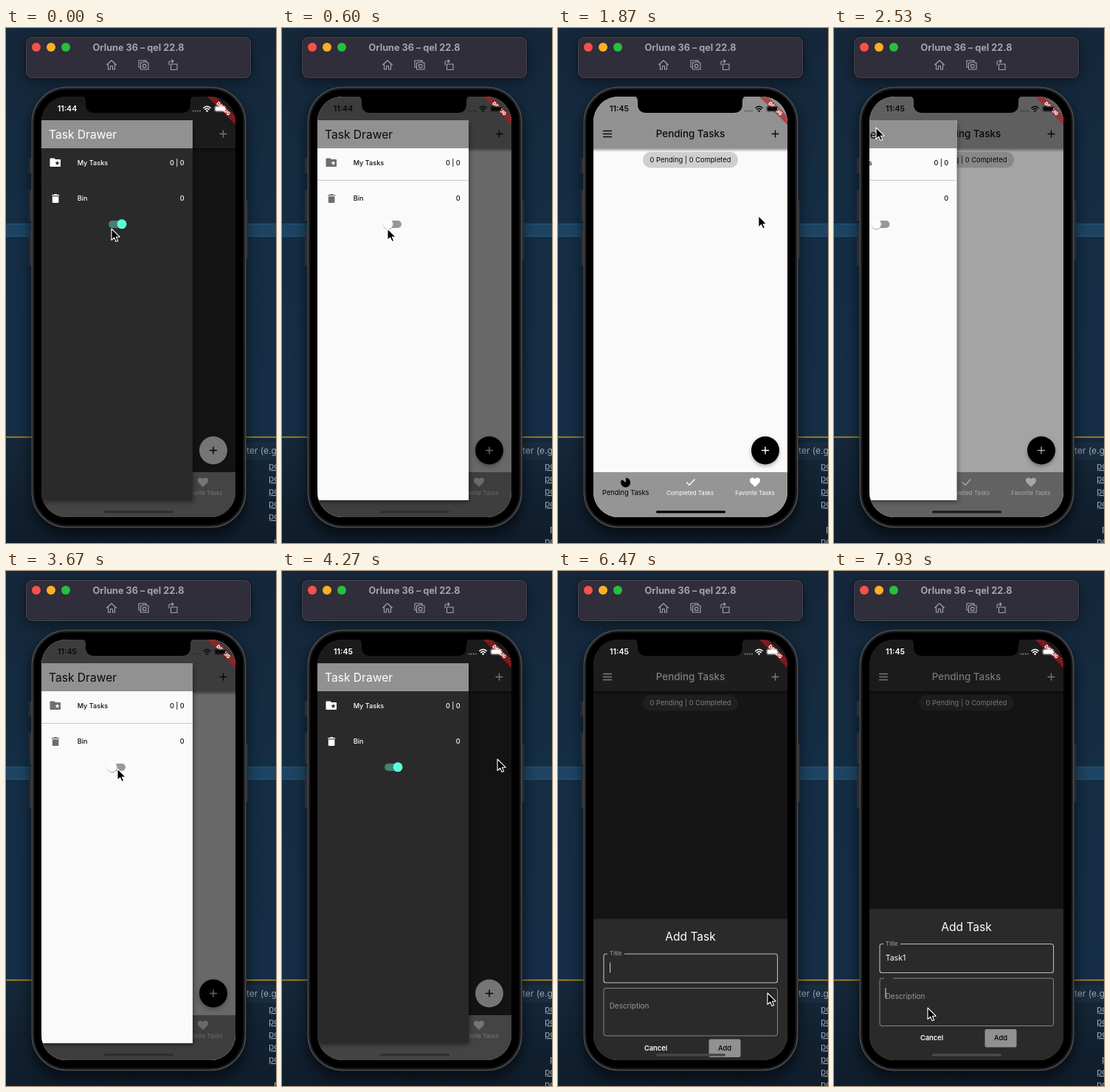
An HTML page for the animation above (8000 ms loop, 366 by 698 pixels).

```html
<!DOCTYPE html>
<html lang="en">
<head>
<meta charset="utf-8">
<title>Task drawer demo</title>
<style>
  html, body { margin: 0; width: 100%; height: 100%; overflow: hidden; background: #14293d; }
  svg { display: block; width: 366px; height: 698px; font-family: Inter, Roboto, sans-serif; }
  .mid { text-anchor: middle; }
  .end { text-anchor: end; }
  .line { fill: none; stroke-linecap: round; stroke-linejoin: round; }
  .bar { fill: var(--bar); }
  .canvas { fill: var(--canvas); }
  .ink { fill: var(--ink); }
  .inkLine { stroke: var(--ink); }
  .icon { fill: var(--icon); }
</style>
</head>
<body>
<svg viewBox="0 0 366 698">
  <defs>
    <linearGradient id="sky" x1="0" y1="0" x2="0" y2="1">
      <stop offset="0" stop-color="#15273a"/><stop offset=".45" stop-color="#142d43"/><stop offset="1" stop-color="#152d46"/>
    </linearGradient>
    <linearGradient id="panel" x1="0" y1="0" x2="0" y2="1">
      <stop offset="0" stop-color="#152839"/><stop offset="1" stop-color="#0f1c2b"/>
    </linearGradient>
    <linearGradient id="fade" x1="0" y1="0" x2="0" y2="1">
      <stop offset="0" stop-opacity=".4"/><stop offset="1" stop-opacity="0"/>
    </linearGradient>
    <filter id="soft" x="-30%" y="-30%" width="160%" height="160%"><feGaussianBlur stdDeviation="9"/></filter>
    <filter id="near" x="-30%" y="-30%" width="160%" height="160%"><feGaussianBlur stdDeviation="3"/></filter>
    <clipPath id="screen"><rect x="48" y="93" width="263" height="570" rx="34"/></clipPath>
  </defs>

  <!-- desktop -->
  <rect width="366" height="555" fill="url(#sky)"/>
  <rect y="265" width="366" height="18" fill="#1d4462"/>
  <path d="M0 265.5H366M0 282.5H366" stroke="#285372"/>
  <rect y="554" width="366" height="144" fill="url(#panel)"/>
  <path d="M0 554.5H366" stroke="#c2951f" stroke-width="1.4"/>
  <rect x="300" y="561" width="66" height="24" fill="#1a2d40"/>
  <text x="326" y="577" font-size="12" fill="#9aa5b0">ter (e.g</text>
  <g id="log" font-size="12" fill="#98a4b0"></g>

  <!-- window toolbar -->
  <rect x="27" y="18" width="305" height="54" rx="9" opacity=".45" filter="url(#soft)"/>
  <rect x="26.5" y="11.5" width="306" height="57" rx="9" fill="#302e3b" stroke="#0d1219"/>
  <rect x="27.5" y="12.5" width="304" height="55" rx="8" fill="none" stroke="#4d4b57" stroke-width=".8"/>
  <circle cx="41" cy="26" r="6" fill="#f8524b"/>
  <circle cx="61" cy="26" r="6" fill="#fcb024"/>
  <circle cx="81" cy="26" r="6" fill="#28bf3c"/>
  <text class="mid" x="179.5" y="30.5" font-size="12.7" font-weight="700" fill="#a5a3ad">Orlune 36 – qel 22.8</text>
  <g class="line" stroke="#a5a3ad" stroke-width="1.1">
    <path d="M136.500 50L143 44L149.500 50M138.500 49V56H141.500V51.500H144.500V56H147.500V49"/>
    <path d="M182 53H180V44H190V46M182.500 47H185L186 45.800H189.500L190.500 47H193V56H182.500Z"/>
    <circle cx="187.700" cy="51.400" r="2.300"/>
    <path d="M223.500 49H232V56.500H223.500ZM221 50V46Q221 45 222 45H227M225 43L227 45L225 47"/>
  </g>

  <!-- phone body -->
  <rect x="34" y="88" width="292" height="598" rx="47" opacity=".6" filter="url(#soft)"/>
  <path d="M33 176V197M33 219V262M33 275V322M326 234V313" stroke="#2b2d31" stroke-width="4"/>
  <rect x="35.500" y="80.500" width="289" height="596" rx="47" stroke="#46474a" stroke-width="2"/>
  <rect x="37.500" y="82.500" width="285" height="592" rx="45" fill="none" stroke="#1d1d1f" stroke-width="1.500"/>

  <g clip-path="url(#screen)">
    <rect class="canvas" x="48" y="93" width="263" height="570"/>
    <rect x="48" y="163" width="263" height="5" fill="url(#fade)"/>
    <rect class="bar" x="48" y="93" width="263" height="70"/>
    <path class="line inkLine" d="M61.500 139.500H72.500M61.500 143.500H72.500M61.500 147.500H72.500" stroke-width="1.300"/>
    <path class="line inkLine" d="M290 143.500H299M294.500 139V148" stroke-width="1.400"/>
    <text class="ink mid" x="179.500" y="148.300" font-size="13.400" font-weight="500">Pending Tasks</text>
    <rect x="115" y="168" width="129" height="21.500" rx="10.700" fill="var(--chip)"/>
    <text class="ink mid" x="179.500" y="182.200" font-size="9.400">0 Pending | 0 Completed</text>

    <circle cx="281" cy="575" r="18" opacity=".4" filter="url(#near)"/>
    <circle cx="281" cy="572.500" r="19" fill="var(--fab)"/>
    <path class="line" d="M276.500 572.500H285.500M281 568V577" stroke="var(--fabInk)" stroke-width="1.400"/>

    <rect x="48" y="602" width="263" height="61" fill="#959595"/>
    <g fill="var(--pick)">
      <path d="M92 616V609.500A6.500 6.500 0 1 1 86.500 612Z"/>
      <path d="M92 616L86 610.500L90 608.800Z" fill="#959595"/>
      <text class="mid" x="91.700" y="632.500" font-size="9.200">Pending Tasks</text>
    </g>
    <g fill="#fff">
      <path class="line" d="M174.500 616L178 619.500L185 612" fill="none" stroke="#fff" stroke-width="1.400"/>
      <path d="M267 622L261.800 617C258.500 613.500 260 609.500 263.500 609.500Q265.700 609.500 267 611.300Q268.300 609.500 270.500 609.500C274 609.500 275.500 613.500 272.200 617Z"/>
      <text class="mid" x="179.200" y="632.500" font-size="7.850">Completed Tasks</text>
      <text class="mid" x="267" y="632.500" font-size="7.850">Favorite Tasks</text>
    </g>

    <rect id="scrim" x="48" y="93" width="263" height="570"/>

    <g id="drawer">
      <rect x="48" y="130" width="206" height="512" opacity=".45" filter="url(#near)"/>
      <rect class="canvas" x="48" y="125" width="205" height="515"/>
      <rect x="48" y="125" width="205" height="38" fill="#919191"/>
      <text class="ink" x="58" y="150" font-size="15.600">Task Drawer</text>
      <path d="M48 206.500H253" stroke="var(--rule)"/>
      <path class="icon" d="M60.500 176.500H65.500L67 178H73Q74 178 74 179V187Q74 188 73 188H60.500Q59.500 188 59.500 187V177.500Q59.500 176.500 60.500 176.500Z"/>
      <path class="canvas" d="M69.500 179.800L70.300 182L72.600 182.100L70.800 183.500L71.400 185.700L69.500 184.500L67.600 185.700L68.200 183.500L66.400 182.100L68.700 182Z"/>
      <path class="icon" d="M62 226H65L65.700 225H68.700L69.400 226H72.200V227.300H62ZM62.800 228.300H71.400V236Q71.400 237 70.400 237H63.800Q62.800 237 62.800 236Z"/>
      <g class="ink" font-size="9.150" font-weight="500">
        <text x="96.700" y="185.500">My Tasks</text>
        <text x="96.700" y="234.300">Bin</text>
        <text class="end" x="241.700" y="185.500">0 | 0</text>
        <text class="end" x="241.700" y="234.300">0</text>
      </g>
      <rect x="139" y="261" width="23" height="10" rx="5" fill="var(--track)"/>
      <g id="thumb">
        <circle cy="267" r="6.500" opacity=".3"/>
        <circle cy="265.800" r="6.500" fill="var(--thumb)"/>
      </g>
    </g>

    <g id="sheet">
      <rect x="48" y="458" width="263" height="206" fill="#2a2a2a"/>
      <text class="mid" x="179.500" y="487.500" font-size="15.600" fill="#fff">Add Task</text>
      <rect x="62" y="505.500" width="235.500" height="39" rx="3" fill="none" stroke="#bdbdbd" stroke-width="1.100"/>
      <rect x="67" y="503" width="23" height="5" fill="#2a2a2a"/>
      <text x="70" y="508" font-size="8.100" fill="#a2a2a2">Title</text>
      <text id="typed" x="69.700" y="528" font-size="10.500" fill="#fff"></text>
      <rect x="62" y="552" width="235.500" height="64.500" rx="3" fill="none" stroke="#858585"/>
      <rect id="gap" x="68" y="550" width="12" height="4" fill="#2a2a2a"/>
      <text x="69.700" y="579.500" font-size="9.950" fill="#999">Description</text>
      <rect id="caret" width="1.200" height="14" fill="#bbb"/>
      <text class="mid" x="132.500" y="636.300" font-size="9.300" font-weight="600" fill="#fff">Cancel</text>
      <rect x="204.500" y="621" width="43" height="24.500" rx="2.500" fill="#919191"/>
      <text class="mid" x="226" y="636.300" font-size="9.300" font-weight="500">Add</text>
    </g>

    <!-- system overlays -->
    <g transform="translate(311 93) rotate(45)">
      <rect x="-28" y="18.900" width="56" height="8.100" fill="#b71c1c" fill-opacity=".63"/>
      <text class="mid" y="25.400" font-size="6.700" font-weight="900" fill="#fff">DEBUG</text>
    </g>
    <path d="M102 92.500Q108 92.500 108 99V103Q108 115 120 115H238Q250 115 250 103V99Q250 92.500 256 92.500Z"/>
    <text id="clock" class="ink mid" x="83" y="113.300" font-size="10.600" font-weight="600"></text>
    <path d="M252.500 112.500H264" stroke="var(--ink)" stroke-opacity=".35" stroke-width="2" stroke-dasharray="2 1.200"/>
    <path class="line inkLine" d="M267.800 108.300Q272.500 104.300 277.200 108.300M269.700 110.400Q272.500 108.200 275.300 110.400" stroke-width="1.500" stroke-linecap="butt"/>
    <circle class="ink" cx="272.500" cy="112.500" r="1.300"/>
    <rect x="282.500" y="105.500" width="15.500" height="8" rx="2.300" fill="none" stroke="var(--ink)" stroke-opacity=".4" stroke-width=".8"/>
    <rect class="ink" x="283.500" y="106.500" width="13.500" height="6" rx="1.400"/>
    <rect id="home" x="133" y="654.300" width="94" height="3.300" rx="1.600"/>
  </g>

  <path id="mouse" d="M0 0V15.500L3.700 12.100L6.100 17.500L8.700 16.400L6.400 11.200H11.200Z" stroke="#fff" stroke-width="1.100" stroke-linejoin="round"/>
</svg>
<script>
const LOOP = 8000;
const $ = id => document.getElementById(id);
const clamp = x => Math.min(1, Math.max(0, x));
const ramp = (t, start, length) => clamp((t - start) / length);
const smooth = x => (1 - Math.cos(Math.PI * x)) / 2;
const mix = (a, b, k) => a + (b - a) * k;
const gray = v => [v, v, v];

// [light, dark]
const theme = {
  bar: [gray(145), gray(58)],
  canvas: [gray(250), gray(42)],
  chip: [gray(207), gray(62)],
  ink: [gray(10), gray(255)],
  icon: [gray(110), gray(255)],
  rule: [gray(203), gray(38)],
  fab: [gray(0), gray(255)],
  fabInk: [gray(255), gray(0)],
  pick: [gray(0), [92, 255, 218]],
  track: [gray(152), [69, 128, 113]],
  thumb: [gray(252), [92, 255, 218]]
};

// time, x, y
const mousePath = [
  [0, 143, 272], [750, 143, 272], [1330, 287, 263], [1780, 287, 263],
  [2330, 57, 135], [2750, 57, 135], [3450, 151, 268], [3800, 151, 268],
  [4210, 292, 255], [4750, 292, 255], [5470, 302, 514], [5850, 284, 572],
  [6850, 284, 572], [7180, 326, 592], [7925, 326, 592], [7926, 127, 592], [LOOP, 127, 592]
];
const keyTimes = [6870, 6970, 7070, 7170, 7400];
// time, row holding the indented log entry
const logSteps = [[0, 6], [600, 5], [2670, 6], [3870, 4], [4870, 9], [6870, 4]];

const svgNS = "http://www.w3.org/2000/svg";
const logRows = Array.from({ length: 7 }, (_, i) => {
  const row = document.createElementNS(svgNS, "text");
  row.setAttribute("y", 598 + 17 * i);
  return $("log").appendChild(row);
});

function mouseAt(t) {
  const next = mousePath.findIndex((key, i) => i && key[0] >= t);
  const [t0, x0, y0] = mousePath[next - 1];
  const [t1, x1, y1] = mousePath[next];
  const k = smooth(ramp(t, t0, t1 - t0));
  return [mix(x0, x1, k), mix(y0, y1, k)];
}

function drawLog(t) {
  const indented = logSteps.filter(([start]) => t >= start).pop()[1];
  logRows.forEach((row, i) => {
    row.textContent = i === indented - 1 ? "" : i === indented ? "p" : "po";
    row.setAttribute("x", i === indented ? 363 : 356);
    row.setAttribute("text-decoration", i === indented ? "none" : "underline");
  });
}

function drawSheet(t) {
  const shown = 1 - (1 - ramp(t, 6270, 270)) ** 2;
  $("sheet").setAttribute("transform", `translate(0 ${206 * (1 - shown)})`);
  const describing = t >= 7926;
  $("typed").textContent = "Task1".slice(0, keyTimes.filter(k => t >= k).length);
  $("gap").setAttribute("visibility", describing ? "visible" : "hidden");
  const caret = $("caret");
  caret.setAttribute("x", describing ? 69.3 : 70 + $("typed").getComputedTextLength());
  caret.setAttribute("y", describing ? 565 : 517);
  return shown;
}

function draw(t) {
  const dark = 1 - smooth(ramp(t, 270, 200)) + smooth(ramp(t, 3710, 200));
  for (const [name, [light, night]] of Object.entries(theme)) {
    const rgb = light.map((v, i) => Math.round(mix(v, night[i], dark)));
    document.documentElement.style.setProperty("--" + name, `rgb(${rgb})`);
  }

  const slide = (start) => smooth(ramp(t, start, 300));
  const open = 1 - slide(1434) + slide(2366) - slide(4330);
  $("drawer").setAttribute("transform", `translate(${205 * (open - 1)} 0)`);
  $("drawer").setAttribute("visibility", open > 0.001 ? "visible" : "hidden");
  $("thumb").setAttribute("transform", `translate(${mix(144, 157, dark)} 0)`);

  const sheet = drawSheet(t);
  const cover = Math.max(open, sheet);
  $("scrim").setAttribute("opacity", 1 - (1 - 0.54 * cover) ** mix(1.13, 1, dark));
  const home = Math.round(sheet > 0 ? 75 * sheet : 46 * open);
  $("home").setAttribute("fill", `rgb(${gray(home)})`);
  $("clock").textContent = t < 870 ? "11:44" : "11:45";

  drawLog(t);
  $("mouse").setAttribute("transform", `translate(${mouseAt(t)})`);
}

const began = performance.now();
function tick() {
  draw((performance.now() - began) % LOOP);
  requestAnimationFrame(tick);
}
tick();
</script>
</body>
</html>
```
